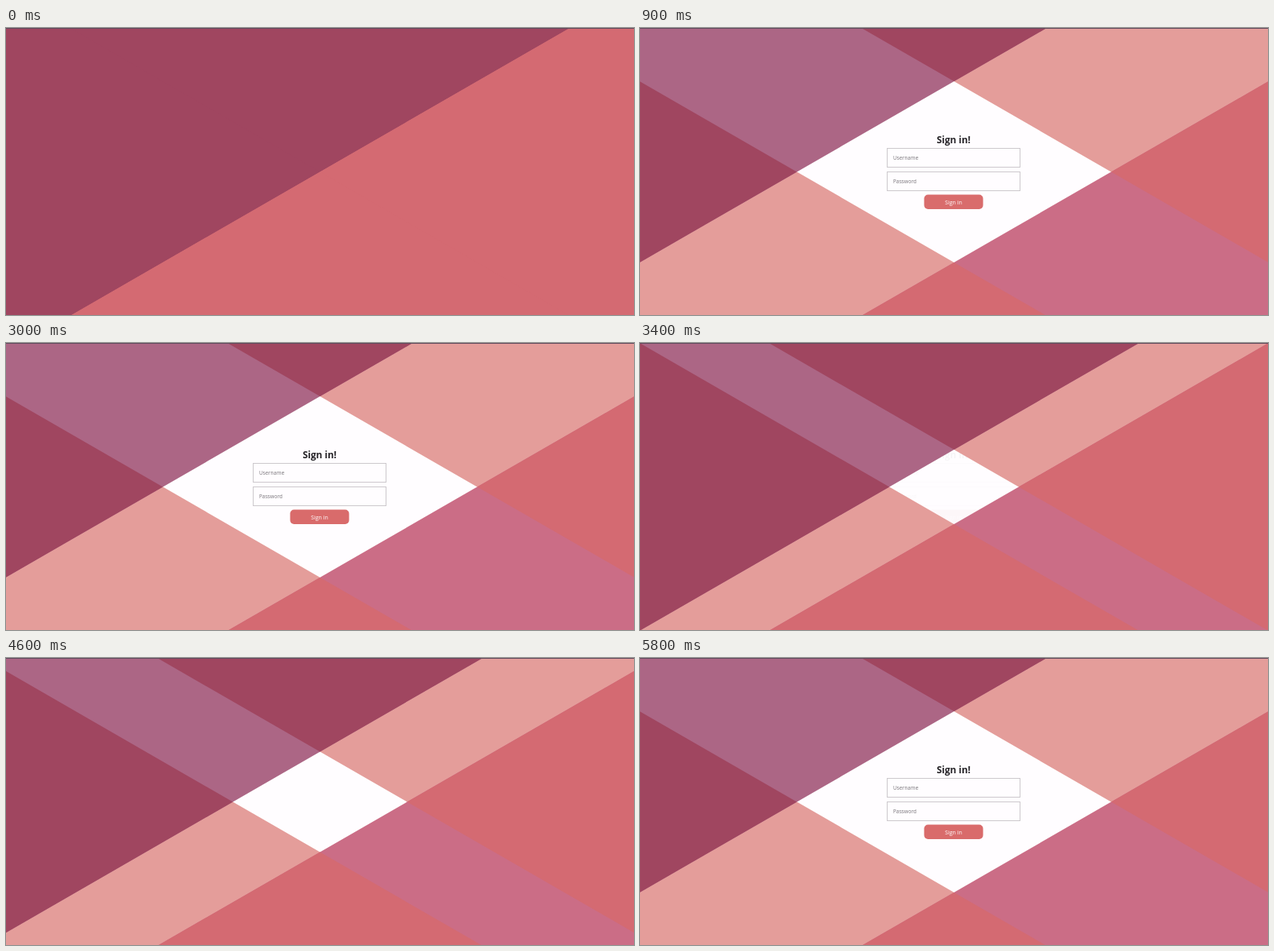
An HTML page for the animation above (6300 ms loop, 799 px wide and 366 px high).

```html
<!DOCTYPE html>
<html lang="en">
<head>
<meta charset="utf-8">
<title>Sign in</title>
<style>
  html, body { margin: 0; width: 100%; height: 100%; overflow: hidden; background: #fffdff; }
  svg { display: block; width: 799px; height: 366px; }
  text { font-family: "Open Sans", sans-serif; }
  .field { fill: #fffdff; stroke: #ccc8cc; }
  .hint { font-size: 6.65px; fill: #777378; }
</style>
</head>
<body>
<svg viewBox="0 0 799 366">
  <rect width="799" height="366" fill="#fffdff"/>
  <g id="form">
    <text x="399" y="147" font-size="12" font-weight="700" text-anchor="middle" fill="#242226">Sign in!</text>
    <rect class="field" x="314.5" y="153.5" width="169" height="24"/>
    <text class="hint" x="322" y="168">Username</text>
    <rect class="field" x="314.5" y="183.5" width="169" height="24"/>
    <text class="hint" x="322" y="198">Password</text>
    <rect x="361.5" y="212.5" width="75" height="18.5" rx="5" fill="#d96b6b"/>
    <text x="399" y="224.5" font-size="7.1" text-anchor="middle" fill="#fff">Sign in</text>
  </g>
  <g id="panels" transform="translate(399.5 183.5)"></g>
  <rect width="799" height="1" fill="#5f4a5c"/>
</svg>
<script>
const LOOP = 6300, STEP = 100, OPEN = 200, FAR = 900;
const SLOPE = Math.tan(Math.PI / 6);
const MAROON = '#a04660', RED = '#d46a72', PINK = '#e49d9a', MAUVE = '#ac6685', ROSE = '#cb6d86';
const panels = document.getElementById('panels');
const form = document.getElementById('form');

function polygon(fill) {
  const p = document.createElementNS('http://www.w3.org/2000/svg', 'polygon');
  p.setAttribute('fill', fill);
  return panels.appendChild(p);
}

// Four half planes (one per corner), then the wedges where two of them overlap.
const corners = [[1, -1, PINK], [-1, 1, PINK], [-1, -1, MAUVE], [1, 1, ROSE]]
  .map(([sx, sy, fill]) => ({ sx, sy, fill, el: polygon(fill) }));
const wedges = [[-1, 0, MAROON], [0, -1, MAROON], [1, 0, RED], [0, 1, RED]]
  .map(([dx, dy, fill]) => ({ dx, dy, el: polygon(fill) }));

function setPoints(el, points) {
  el.setAttribute('points', points.map(([x, y]) => [x, y * SLOPE]).join(' '));
}

function drawPanels(w) {
  for (const { sx, sy, fill, el } of corners) {
    const points = [[w - FAR, FAR], [w + FAR, -FAR], [w + FAR, FAR]];
    setPoints(el, points.map(([x, y]) => [sx * x, sy * y]));
    const shut = sx < 0 ? MAROON : RED;
    el.setAttribute('fill', w === 0 && sx === sy ? shut : fill);
  }
  for (const { dx, dy, el } of wedges) {
    const tip = [dx * w, dy * w];
    const side = s => [tip[0] + FAR * (dx || s), tip[1] + FAR * (dy || s)];
    setPoints(el, [tip, side(-1), side(1)]);
  }
}

const clamp = u => Math.min(1, Math.max(0, u));
const progress = (t, start, length) => clamp((t - start) / length);
const smooth = u => (1 - Math.cos(Math.PI * u)) / 2;

// cubic-bezier(.445, .05, 0, 1)
function ease(u) {
  if (u <= 0 || u >= 1) return clamp(u);
  const curve = (s, a, b) => 3 * (1 - s) ** 2 * s * a + 3 * (1 - s) * s * s * b + s ** 3;
  let lo = 0, hi = 1;
  for (let i = 0; i < 30; i++) {
    const mid = (lo + hi) / 2;
    if (curve(mid, .445, 0) < u) lo = mid; else hi = mid;
  }
  return curve(lo, .05, 1);
}

function halfWidth(t) {
  if (t < 3000) return OPEN * ease(progress(t, 267, 500));
  if (t < 4200) return OPEN * (1 - ease(progress(Math.min(t, 3700), 3243, 500)));
  return OPEN * smooth(progress(t, 4160, 823));
}

function formAlpha(t) {
  if (t < 3000) return ease(progress(t, 467, 500));
  if (t < 4200) return 1 - ease(progress(t, 3043, 500));
  return ease(progress(t, 4650, 500));
}

function frame(now) {
  const t = Math.floor(now % LOOP / STEP) * STEP;
  drawPanels(halfWidth(t));
  form.setAttribute('opacity', formAlpha(t));
  requestAnimationFrame(frame);
}
frame(0);
</script>
</body>
</html>
```
